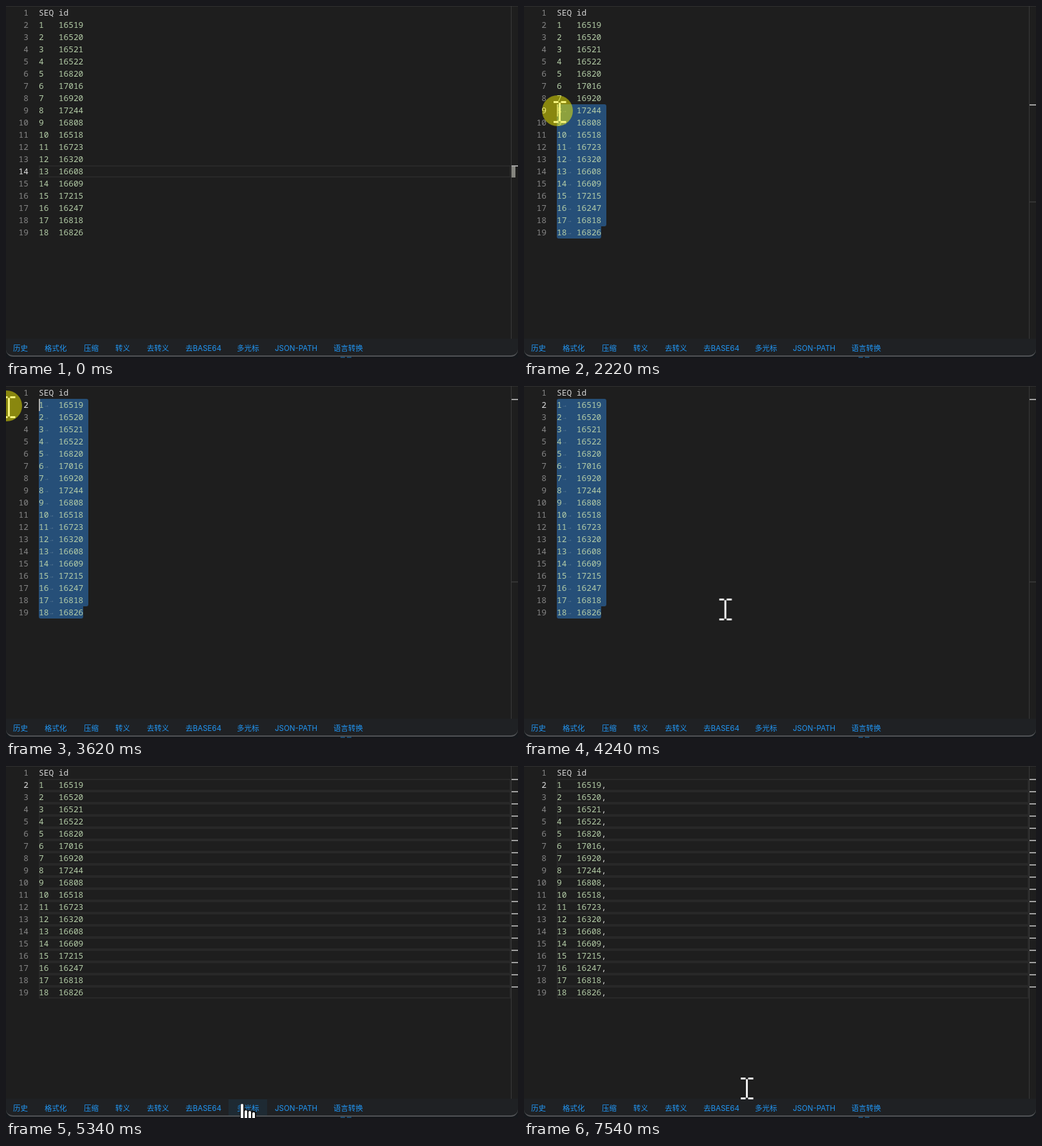
Write an HTML page that moves like this. It is 796x548 px and loops after 8000 ms.

```html
<!DOCTYPE html>
<html lang="zh-CN">
<head>
<meta charset="utf-8">
<title>Multi-cursor editing</title>
<style>
@property --line { syntax: '<integer>'; inherits: true; initial-value: 14; }

html, body { margin: 0; width: 796px; height: 548px; overflow: hidden; background: #15181c; }
div, i, svg { position: absolute; left: 0; top: 0; box-sizing: border-box; }

#app {
  width: 796px; height: 546px; overflow: hidden;
  background: #1e1e1e; border-radius: 0 0 11px 11px;
  font: 500 12.83px/19px 'Noto Sans Mono', monospace; white-space: pre; tab-size: 4;
  --top: calc(var(--line) * 19px - 18px);
  animation: line 8s infinite;
}
#edge {
  inset: 0 0 2px; border: solid #505255; border-width: 0 0 2px;
  border-radius: 0 0 11px 11px;
}
#topline { width: 796px; height: 1px; background: #303030; }
#ruler { left: 785px; width: 1px; height: 518px; background: #3a3a3a; }
.speck { top: 546px; width: 7px; height: 2px; background: #1b4668; }

/* editor rows */
.row { top: calc(var(--i) * 19px - 18px); width: 796px; height: 19px; }
.num { width: 35px; text-align: right; color: #858585; }
.code { left: 51px; color: #b5cea8; }
.head, .comma { color: #d4d4d4; }
.comma { left: 120.3px; }
.frame { left: 51px; width: 734px; height: 19px; border: 2px solid #282828; }
.bar { left: 786px; width: 10px; height: 2px; background: #a0a0a0; }
.caret { width: 2px; height: 19px; background: #aeafad; }
#active { top: var(--top); width: 35px; height: 19px; background: #1e1e1e; color: #e0e0e0;
  text-align: right; counter-reset: n var(--line); }
#active::before { content: counter(n); }
#mark { top: var(--top); }
#thumb { left: 786px; top: 248px; width: 6px; height: 19px; background: #85857f; }
#trace { left: 786px; top: 304px; width: 10px; height: 2px; background: #333; }

/* selection */
.sel { left: 51px; overflow: hidden; }
#body { top: var(--top); width: 77px; height: calc(343px - var(--top)); border-radius: 3px 3px 3px 0; }
#last { top: 343px; width: 69px; height: 19px; border-radius: 0 0 3px 3px; }
.tab { top: auto; height: 19px; font-size: 10.5px; color: rgba(227, 228, 226, .27); }
#head { left: 51px; top: var(--top); }

/* toolbar */
#bar { top: 518px; width: 796px; height: 28px; background: #1f2124;
  font: 11.5px/30px Inter, 'Noto Sans CJK SC', sans-serif; color: #2196f3; }
#hover { left: 346px; top: 1px; width: 60px; height: 27px; background: #1e2a33; }

/* pointer */
#pointer { width: 0; height: 0; animation: path 8s linear infinite; }
#pointer svg { overflow: visible; width: 1px; height: 1px; }
#halo { left: -24px; top: -24px; width: 48px; height: 48px; border-radius: 50%; background: rgba(255, 250, 0, .48); }

/* timeline */
.idle, .drag, .multi, .caret, .comma, #trace, #head, #hover, #ibeam, #hand, #halo {
  animation: 8s step-end infinite;
}
.idle { animation-name: idle; }
.drag { animation-name: drag; }
.multi { animation-name: multi; }
.caret { animation-name: blink; }
#head { animation-name: head; }
.comma { animation-name: typed; }
#trace { animation-name: trace; }
#hover, #hand { animation-name: hover; }
#ibeam { animation-name: ibeam; }
#halo { animation-name: halo; }

@keyframes line {
  0% { --line: 14; animation-timing-function: step-end; }
  19.25% { --line: 19; animation-timing-function: linear; }
  27.75% { --line: 9; animation-timing-function: linear; }
  28.75% { --line: 9; animation-timing-function: linear; }
  39.375% { --line: 3; animation-timing-function: step-end; }
  41.5%, 100% { --line: 2; }
}
@keyframes path {
  0% { transform: translate(602px, 529px); }
  8.5% { transform: translate(602px, 529px); animation-timing-function: ease-out; }
  15% { transform: translate(202px, 402px); }
  18.125%, 19.1% { transform: translate(133px, 342px); }
  19.25% { transform: translate(118px, 350px); }
  27.75% { transform: translate(52px, 163px); }
  28.75% { transform: translate(52px, 168px); }
  39.375% { transform: translate(8px, 42px); }
  44%, 46.5% { transform: translate(1px, 31px); }
  50.5% { transform: translate(169px, 183px); }
  53.2% { transform: translate(320px, 358px); }
  54.2% { transform: translate(355px, 408px); }
  55% { transform: translate(377px, 438px); }
  57%, 66% { transform: translate(379px, 530px); }
  66.7%, 67.8% { transform: translate(368px, 526px); }
  69.8% { transform: translate(343px, 501px); animation-timing-function: step-end; }
  76.875%, 100% { transform: translate(343px, 500px); }
}
@keyframes idle { 0% { visibility: visible; } 19.25%, 100% { visibility: hidden; } }
@keyframes drag {
  0% { visibility: hidden; background: #264f78; }
  19.25% { visibility: visible; background: #264f78; }
  57.75% { visibility: visible; background: #3a3d41; }
  60.75%, 100% { visibility: hidden; background: #3a3d41; }
}
@keyframes trace { 0% { visibility: hidden; } 21.5% { visibility: visible; } 60.75%, 100% { visibility: hidden; } }
@keyframes multi { 0% { visibility: hidden; } 60.75%, 100% { visibility: visible; } }
@keyframes head {
  0%, 47.375%, 57.75%, 100% { visibility: hidden; }
  19.25%, 54% { visibility: visible; }
}
@keyframes blink {
  0%, 66.75%, 79.75% { visibility: hidden; left: 119px; }
  60.75%, 72.875%, 85.5% { visibility: visible; left: 119px; }
  88.5% { visibility: visible; left: 127px; }
  94.25%, 100% { visibility: hidden; left: 127px; }
}
@keyframes typed { 0% { visibility: hidden; } 88.5%, 100% { visibility: visible; } }
@keyframes hover { 0% { visibility: hidden; } 56.5% { visibility: visible; } 68.8%, 100% { visibility: hidden; } }
@keyframes ibeam {
  0%, 56.5% { visibility: hidden; }
  8.5%, 68.8%, 100% { visibility: visible; }
}
@keyframes halo {
  0%, 47.375%, 60.75%, 100% { visibility: hidden; }
  19.25%, 57% { visibility: visible; }
}
</style>
</head>
<body>
<i class="speck" style="left:520px"></i><i class="speck" style="left:530px"></i>
<div id="app"></div>
<div id="edge"></div>
<div id="pointer">
  <svg id="ibeam"><path d="M-6 -13.5h7.5M5.5 -13.5h8M-6 17.5h7.5M5.5 17.5h8M3.5 -12.5V16.5" fill="none" stroke="#eee" stroke-width="3"/></svg>
  <svg id="hand">
    <path d="M-4 2q3-4 6 0v7q3-1 6 1 3-1 6 1 4-1 7 2v16h-18l-7-8z" fill="#111"/>
    <g fill="#fff">
      <rect x="-3" width="4" height="24" rx="2"/>
      <rect x="3" y="10" width="4" height="16" rx="2"/>
      <rect x="9" y="11" width="4" height="15" rx="2"/>
      <rect x="15" y="13" width="4" height="13" rx="2"/>
    </g>
  </svg>
  <div id="halo"></div>
</div>
<script>
const ids = [16519, 16520, 16521, 16522, 16820, 17016, 16920, 17244, 16808,
  16518, 16723, 16320, 16608, 16609, 17215, 16247, 16818, 16826];
const buttons = [[11, '历史'], [60, '格式化'], [121, '压缩'], [170, '转义'], [219, '去转义'],
  [279, '去BASE64'], [359, '多光标'], [418, 'JSON-PATH'], [509, '语言转换']];

const row = (line, html) => `<div class="row" style="--i:${line}">${html}</div>`;
const each = fn => ids.map((id, k) => fn(k + 1, id)).join('');
const tab = (seq, bottom) =>
  `<div class="tab" style="left:${String(seq).length * 7.7 + 1}px;bottom:${bottom}px">→</div>`;

document.getElementById('app').innerHTML = `
  <div id="topline"></div><div id="ruler"></div>
  <div class="idle">${row(14, '<div class="frame"></div>')}</div>
  <div id="thumb" class="idle"></div><div id="trace"></div>
  <div class="multi">${each(n => row(n + 1, '<div class="frame"></div><div class="bar"></div>'))}</div>
  <div id="mark" class="bar"></div>
  <div id="body" class="sel drag">${each(n => n < 18 ? tab(n, (17 - n) * 19) : '')}</div>
  <div id="last" class="sel drag">${tab(18, 0)}</div>
  ${row(1, '<div class="num">1</div><div class="code head">SEQ\tid</div>')}
  ${each((n, id) => row(n + 1, `<div class="num">${n + 1}</div><div class="code">${n}\t${id}</div>` +
    '<div class="comma">,</div><div class="caret"></div>'))}
  <div id="active"></div><div id="head" class="caret"></div>
  <div id="bar"><div id="hover"></div>${buttons.map(([x, name]) =>
    `<div style="left:${x}px">${name}</div>`).join('')}</div>`;
</script>
</body>
</html>
```
